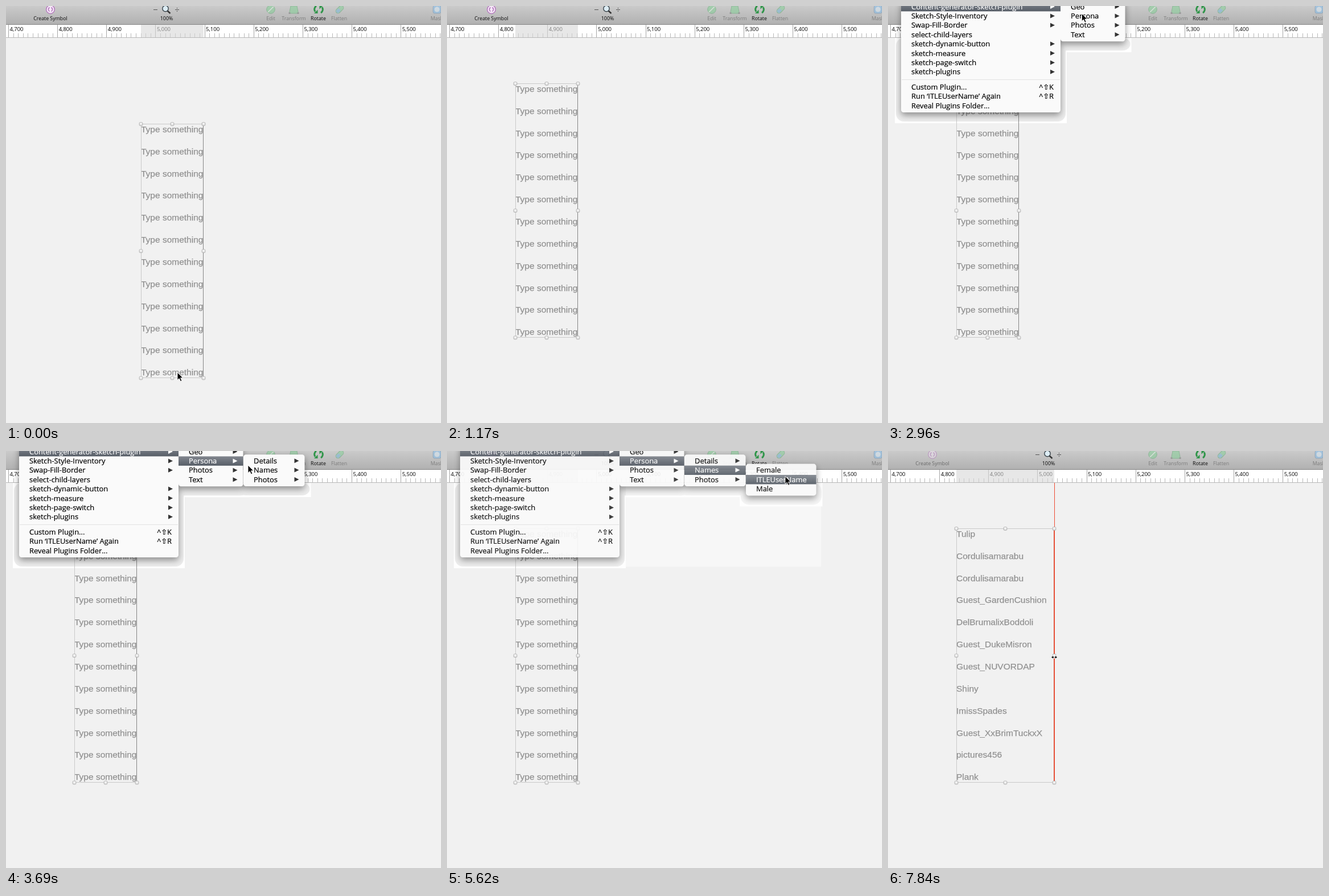
Animation of 764 by 733 pixels, one loop 7.99 s. Source, as an HTML page:

```html
<!DOCTYPE html>
<html lang="en">
<head>
<meta charset="utf-8">
<title>Filling layers from a plugin menu</title>
<style>
  html, body { margin: 0; width: 100%; height: 100%; overflow: hidden; background: #f1f1f1; }
  svg { display: block; width: 764px; height: 733px; }
  text { white-space: pre; }
  .ui { font: 12.9px "Open Sans", "DejaVu Sans", sans-serif; fill: #000; stroke: #000; stroke-width: .2; }
  .ui.lit { fill: #fff; stroke: #fff; }
  .label { font: 8.8px "Open Sans", sans-serif; fill: #0a0a0a; text-anchor: middle; }
  .off { fill: #7d7d7d; }
  .tick { font: 9.5px "Open Sans", sans-serif; fill: #000; }
  .layer { font: 15.5px "Liberation Sans", Arial, sans-serif; fill: #919191; stroke: #919191; stroke-width: .25; }
  #menus { filter: drop-shadow(0 5px 6px rgba(0, 0, 0, .4)); }
</style>
</head>
<body>
<svg viewBox="0 0 764 733">
  <defs>
    <linearGradient id="bar" x2="0" y2="1">
      <stop stop-color="#cacaca"/><stop offset="1" stop-color="#b1b1b1"/>
    </linearGradient>
    <linearGradient id="lit" x2="0" y2="1">
      <stop stop-color="#82878f"/><stop offset="1" stop-color="#575e67"/>
    </linearGradient>
    <linearGradient id="knob" x2="0" y2="1">
      <stop stop-color="#fff"/><stop offset="1" stop-color="#dedede"/>
    </linearGradient>
  </defs>
  <rect width="764" height="733" fill="#f1f1f1"/>

  <g id="toolbar">
    <rect width="764" height="32" fill="url(#bar)"/>
    <rect y="32" width="764" height="1" fill="#858585"/>
    <g id="symbol">
      <circle cx="78" cy="6" r="7.3" fill="#f4e9f6" stroke="#b06bbb" stroke-width="1.3"/>
      <path d="M76.5 2.5a4 4 0 0 0 0 7M79.5 2.5a4 4 0 0 1 0 7" fill="none" stroke="#b06bbb" stroke-width="1.5"/>
      <text class="label" x="78" y="24.5">Create Symbol</text>
    </g>
    <path d="M259 6.5h7M297 6.5h7M300.5 3v1.5M300.5 8.5v1.5" stroke="#555" stroke-width="1.2"/>
    <path d="M283 8l5.5 5" stroke="#333" stroke-width="2.4"/>
    <circle cx="280" cy="4.5" r="5.2" fill="#dcecf5" stroke="#39434a" stroke-width="1.4"/>
    <text class="label" x="282" y="24.5">100%</text>
    <g opacity=".5">
      <circle cx="465" cy="6" r="7.3" fill="#7fd092" stroke="#55a56a"/>
      <path d="M460 11l10-10" stroke="#e9f7ec" stroke-width="1.6"/>
      <path d="M500 0h11l2.5 13h-16z" fill="#7fd092" stroke="#55a56a"/>
      <path d="M496.5 12.500h3M511.5 12.500h3" stroke="#777" stroke-width="3"/>
      <rect x="-8" y="-4" width="16" height="8" rx="4" transform="translate(586 6) rotate(-45)" fill="#7fd092" stroke="#55a56a"/>
      <path d="M586 6l-5 5" stroke="#72b7dd" stroke-width="6"/>
      <rect x="750" y="-1" width="14" height="14" rx="3" fill="#7dbdf0" stroke="#6d8fb0"/>
      <circle cx="757" cy="6" r="4.5" fill="#d9ecfb"/>
    </g>
    <path d="M543 10a7 7 0 0 1 2-10M555 2a7 7 0 0 1-2 10" fill="none" stroke="#2f9549" stroke-width="3"/>
    <path d="M541 13h6.5v-6.5zM557-1h-6.5v6.5z" fill="#2f9549"/>
    <text class="label off" x="465" y="24.5">Edit</text>
    <text class="label off" x="505.5" y="24.5">Transform</text>
    <text class="label" x="548.5" y="24.5">Rotate</text>
    <text class="label off" x="585" y="24.5">Flatten</text>
    <text class="label off" x="756.5" y="24.5">Mask</text>
  </g>

  <g id="ruler"></g>
  <rect id="span" y="33" height="22" fill="rgba(215,215,215,.6)"/>
  <g id="halo"></g>

  <g id="group">
    <g id="rows"></g>
    <path id="frame" fill="none" stroke="#c9c9c9"/>
    <path id="edge" stroke="#868686"/>
    <path id="guide" d="M292.5 56V583M291.7 136V583" stroke="#ee4a31"/>
    <g id="knobs"></g>
  </g>

  <g id="menus"></g>

  <path id="arrow" d="M0 0V13.5L3.2 10.7L5.5 15.8L7.8 14.8L5.6 9.8H9.8Z" stroke="#fff" stroke-width=".9"/>
  <g id="resize">
    <path d="M-5.5 0l4-3v2h3v-2l4 3-4 3v-2h-3v2z" stroke="#fff" stroke-width=".8"/>
    <path d="M0-2.5v5" stroke="#fff"/>
  </g>
</svg>

<script>
// The screen refreshes in beats; all cues below are counted in them.
const LOOP = 7990, BEAT = 148, LEAD = 15;
const PICK = 36, FADE = 38, FILLED = 40, WIDEN = 50, SNAP = 53;
const MENU_OPENS = 13, RESIZE_CURSOR = 47;
const HEIGHT = 446.5, ROW = 16.4;

const $ = id => document.getElementById(id);
const show = (node, on) => node.style.display = on ? "" : "none";
const place = (node, x, y) => node.setAttribute("transform", `translate(${x} ${y})`);
const range = n => [...Array(n).keys()];
const easeOut = p => 1 - (1 - Math.min(1, Math.max(0, p))) ** 2;
const mix = (a, b, p) => a + (b - a) * p;

// The bar marks where a name breaks in the narrow box.
const names = ["Tulip", "Cordulisamara|bu", "Cordulisamara|bu", "Guest_Garden|Cushion",
  "DelBrumalixBo|ddoli", "Guest_DukeMis|ron", "Guest_NUVOR|DAP", "Shiny", "ImissSpades",
  "Guest_XxBrimT|uckxX", "pictures456", "Plank"];

// Pointer stops: beat, x, y
const stops = [[0, 301, 644], [4, 184, 573], [8, -40, -60], [14, -40, -60], [15, 73.5, -6.5],
  [22, 364, 15], [24, 364, 15], [25, 425, 25], [31, 532, 34], [34, 594, 44.5], [42, 594, 44.5],
  [44, 398, 712], [45, 327.5, 338], [RESIZE_CURSOR, 230, 362]];

// Rows the pointer lights: beat, menu, row
const hovers = [[15, 0, 0], [21, 1, 1], [26, 2, 1], [31, 3, 0], [32, 3, 1]];

// ">" at the end opens a submenu, a tab leads to a shortcut.
const menus = [
  { x: 23, w: 280, first: 1, items: [
    "Content-generator-sketch-plugin>", "Sketch-Style-Inventory>", "Swap-Fill-Border>",
    "select-child-layers", "sketch-dynamic-button>", "sketch-measure>", "sketch-page-switch>",
    "sketch-plugins>", "-", "Custom Plugin...\t^⇧K", "Run ‘ITLEUserName’ Again\t^⇧R",
    "Reveal Plugins Folder..."] },
  { x: 303, w: 113.5, first: 1, items: ["Geo>", "Persona>", "Photos>", "Text>"] },
  { x: 417, w: 107.5, first: 17.2, items: ["Details>", "Names>", "Photos>"] },
  { x: 525, w: 123.5, first: 33.6, items: ["Female", "ITLEUserName", "Male"] }
];

const block = (x, y, w, bottom, fill, more = "") =>
  `<rect x="${x}" y="${y}" width="${w}" height="${bottom - y}" fill="${fill}" ${more}/>`;

function menuMarkup(menu) {
  const { x, w, first, items } = menu;
  let y = first;
  const rows = items.map(item => {
    const mid = y;
    if (item === "-") {
      y += 10;
      return `<path d="M${x + 1} ${mid - 2.7}h${w - 2}" stroke="#e2e2e2"/>`;
    }
    y += ROW;
    const [name, keys = ""] = item.replace(">", "").split("\t");
    const tri = item.endsWith(">") ? `<path d="M${x + w - 18} ${mid - 4}l8 4-8 4z"/>` : "";
    return `<g class="row">${block(x, mid - 8, w, mid + 8.4, "url(#lit)")}
      <text class="ui" x="${x + 18}" y="${mid + 4.6}">${name}</text>${tri}
      <text class="ui" x="${x + w - 12}" y="${mid + 4.6}" text-anchor="end">${keys}</text></g>`;
  });
  menu.bottom = y - ROW + 12;
  return `<g>${block(x, first - 11, w, menu.bottom, "#fafafa", 'rx="4.5"')}${rows.join("")}</g>`;
}

function haloMarkup() {
  const white = menus.map(({ x, w, bottom }) => block(x - 11, 56, w + 22, Math.max(56, bottom + 19), "#fff"));
  const soft = menus.map(({ x, w, bottom }) => block(x - 9, 56, w + 18, bottom + 16, "#ececec", 'rx="14"'));
  return white.concat(soft).join("") + block(314, 56, 343, 203.5, "#fff", 'opacity=".5"');
}

function build() {
  const gap = 86.15;
  const marks = range(90).map(i => {
    const x = Math.round(4 + i * gap / 10) + .5;
    return `<path d="M${x} ${i % 10 ? 48 : 33}V55" stroke="${i % 10 ? "#b8b8b8" : "#a6a6a6"}"/>`;
  });
  const labels = range(9).map(i =>
    `<text class="tick" x="${6.5 + i * gap}" y="44.3">${(4700 + i * 100).toLocaleString("en-US")}</text>`);
  $("ruler").innerHTML = block(0, 33, 764, 55, "#fff") + marks.join("") +
    block(0, 55, 764, 56, "#b8b8b8") + labels.join("");
  $("rows").innerHTML = names.map(() => `<text class="layer"></text>`).join("");
  $("knobs").innerHTML = range(9).map(i => i === 4 ? "<g/>" :
    block(-2.8, -2.8, 5.6, 2.8, "url(#knob)", 'rx="1.3" stroke="#a9a9a9" stroke-width=".9"')).join("");
  $("menus").innerHTML = menus.map(menuMarkup).join("");
  $("halo").innerHTML = haloMarkup();
}

function pointerAt(beat) {
  const next = stops.findIndex(stop => stop[0] > beat);
  if (next < 0) return stops.at(-1).slice(1);
  const [from, x0, y0] = stops[next - 1], [to, x1, y1] = stops[next];
  const p = easeOut((beat - from) / (to - from));
  return [mix(x0, x1, p), mix(y0, y1, p)];
}

function drawGroup(beat) {
  const moved = easeOut(beat / 4);
  const x = mix(237, 120, moved), y = mix(207, 136, moved);
  const w = mix(110, 172, easeOut((beat - WIDEN) / (SNAP - WIDEN)));
  const right = x + w, bottom = y + HEIGHT;
  const extra = Math.floor((w - 110) / 8);
  [...$("rows").children].forEach((row, i) => {
    const [head, tail = ""] = names[i].split("|");
    row.setAttribute("x", x);
    row.setAttribute("y", y + 14.8 + i * 38.86);
    row.textContent = beat < FILLED ? "Type something" : head + tail.slice(0, extra);
  });
  $("frame").setAttribute("d", `M${right} ${y + .5}H${x + .5}V${bottom}H${right}`);
  $("edge").setAttribute("d", `M${right - .5} ${y}V${bottom}`);
  [...$("knobs").children].forEach((knob, i) =>
    place(knob, x + i % 3 * w / 2, y + .5 + Math.floor(i / 3) * HEIGHT / 2));
  $("span").setAttribute("x", x);
  $("span").setAttribute("width", w);
  show($("guide"), beat >= SNAP);
  $("symbol").setAttribute("opacity", beat > WIDEN ? .45 : 1);
  place($("resize"), right, 362.5);
}

function drawMenus(beat) {
  const lit = [];
  let last = 0;
  for (const [when, menu, row] of hovers) {
    if (when <= beat) { lit[menu] = row; last = when; }
  }
  // A submenu follows one beat after its row lights.
  const open = beat < MENU_OPENS || beat >= FILLED ? 0 : lit.length + (beat > last);
  if (beat === PICK) lit.pop();
  const alpha = beat < FADE ? 1 : 1 - .07 * (beat - FADE + 1) ** 3;
  for (const id of ["menus", "halo"]) $(id).setAttribute("opacity", Math.max(0, alpha));

  [...$("menus").children].forEach((menu, m) => {
    show(menu, m < open);
    menu.querySelectorAll(".row").forEach((row, r) => {
      const on = lit[m] === r;
      show(row.firstChild, on);
      row.querySelectorAll("text").forEach(text => text.classList.toggle("lit", on));
      row.querySelector("path")?.setAttribute("fill", on ? "#fff" : "#333");
    });
  });
  const halos = [...$("halo").children], veil = halos.pop();
  halos.forEach((box, i) => show(box, i % menus.length < open));
  show(veil, beat >= FADE);
}

function tick() {
  const beat = Math.floor((performance.now() % LOOP + LEAD) / BEAT);
  drawGroup(beat);
  drawMenus(beat);
  place($("arrow"), ...pointerAt(beat));
  show($("arrow"), beat < RESIZE_CURSOR);
  show($("resize"), beat >= RESIZE_CURSOR);
  requestAnimationFrame(tick);
}

build();
tick();
</script>
</body>
</html>
```
